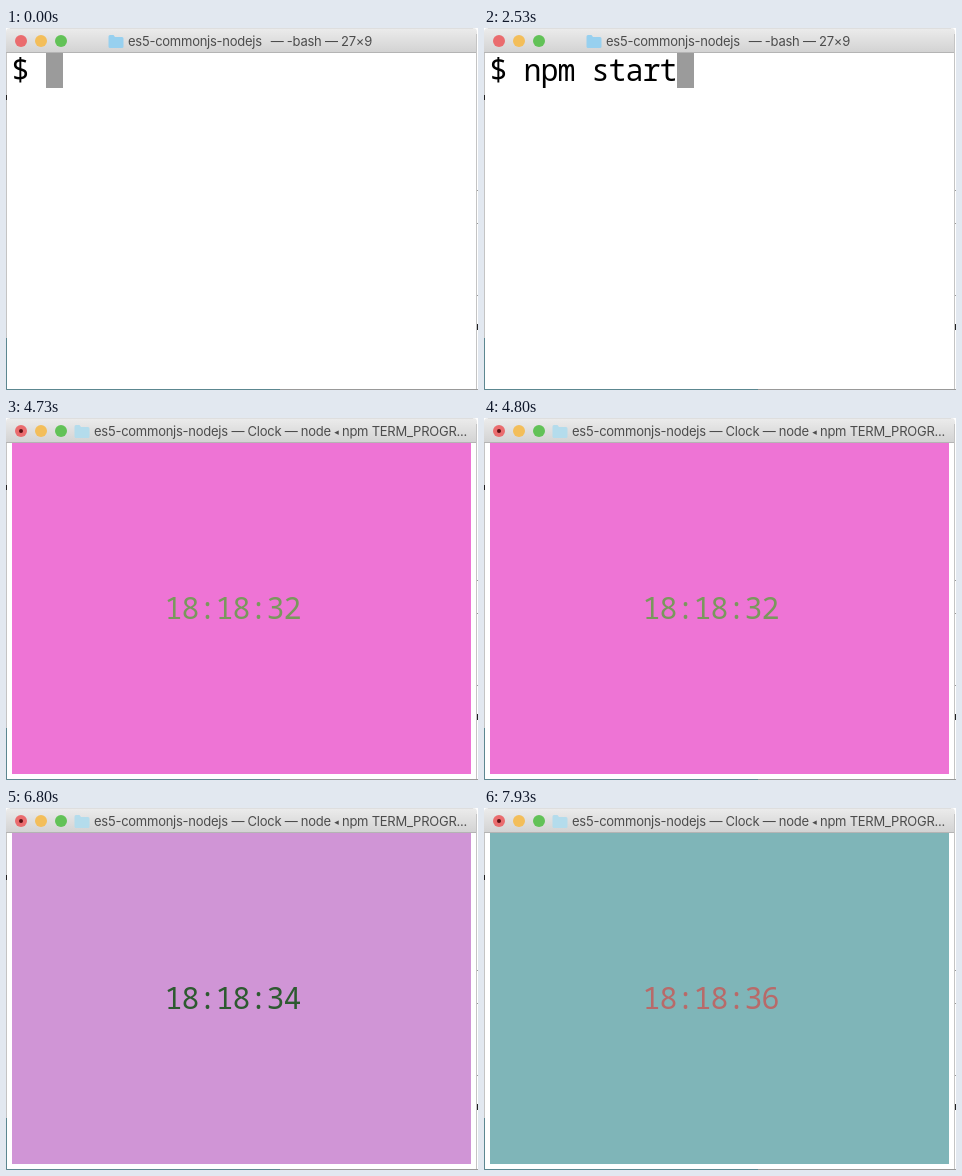
Recreate the animation shown at these times as an HTML page. Size 472 by 362 pixels, loop 8 s.

```html
<!DOCTYPE html>
<html lang="en">
<head>
<meta charset="utf-8">
<title>Terminal clock</title>
<style>
  html, body { margin: 0; width: 100%; height: 100%; overflow: hidden; background: #fff; }
  svg, pre, div { position: absolute; }
  svg { left: 0; top: 0; }
  .title { font: 13px Inter, Roboto, sans-serif; letter-spacing: -.25px; fill: #4c4c4c; }
  .title .arrow { font-size: 9px; }
  #term { left: 6px; top: 25px; width: 459px; height: 331px; overflow: hidden; }
  pre {
    left: -.5px; top: -2px; margin: 0;
    font: 30px/37px "Noto Sans Mono", "DejaVu Sans Mono", monospace;
    letter-spacing: -1px; font-variant-ligatures: none;
  }
  #cursor { width: 17px; height: 37px; background: #9b9b9b; }
</style>
</head>
<body>
<svg width="472" height="362" viewBox="0 0 472 362">
  <defs>
    <linearGradient id="bar" x2="0" y2="1">
      <stop stop-color="#ececec"/><stop offset="1" stop-color="#d3d3d3"/>
    </linearGradient>
  </defs>
  <rect width="472" height="362" fill="#fff"/>
  <path d="M0 24V4Q0 0 4 0H467Q471 0 471 4V24Z" fill="url(#bar)"/>
  <path d="M4 .5H467" stroke="#dedede"/>
  <path d="M0 24.5H470" stroke="#b4b4b4"/>
  <path d="M.5 25V361M470.5 6V361" stroke="#c4c4c4"/>
  <path d="M0 361.5H472" stroke="#999"/>
  <path d="M.5 310V361.5H274" fill="none" stroke="#5c8790"/>
  <path d="M.5 67V72M471.5 296V302" stroke="#222"/>
  <path d="M471 162.5H472M471 195.5H472M471 267.5H472" stroke="#999"/>
  <circle cx="15" cy="13" r="6" fill="#ea6c6e"/>
  <circle cx="35" cy="13" r="6" fill="#f3be5a"/>
  <circle cx="55" cy="13" r="6" fill="#62c257"/>
  <circle id="dot" cx="15" cy="13" r="2" fill="#5a1012"/>
  <path id="folder" d="M0 1.5Q0 0 1.5 0H5L6.5 2H13.5Q15 2 15 3.5V11.5Q15 13 13.5 13H1.5Q0 13 0 11.5Z"/>
  <text id="name" class="title" y="18">es5-commonjs-nodejs</text>
  <text id="tail" class="title" y="18" text-anchor="end"><tspan id="job"></tspan><tspan id="arrow" class="arrow" dy="-1">◂</tspan><tspan id="args" dy="1"></tspan></text>
  <path id="marks" d="M6 28.5H3.5V52.5H6M465 28.5H467.5V52.5H465" fill="none" stroke="#b5b5b5"/>
</svg>
<div id="term">
  <div id="cursor"></div>
  <pre id="screen"></pre>
</div>
<script>
const LOOP = 8000, COL = 17, ROW = 37;
const ENTER = 2930, OUTPUT = 3530, CLOCK = 3730;
const $ = id => document.getElementById(id);

const command = "npm start";
const keyTimes = [870, 1000, 1070, 1200, 1530, 1670, 1800, 1930, 2070];
const output = [
  "", "> @ start /Users/julien/Des", "ktop/js-modules/es5-commonj",
  "s-nodejs", "> node index", "", ""
];

// start, seconds, background, digits
const ticks = [
  [3730, 31, "#8fa3c0", "#705c3f"],
  [4730, 32, "#ee74d5", "#79985c"],
  [5730, 33, "#6bdb7c", "#a8609c"],
  [6730, 34, "#d095d6", "#2d5a30"],
  [7730, 36, "#7fb5b8", "#b86a69"]
];

// start, text before and after the arrow
const titles = [
  [0, "— -bash — 27×9", ""],
  [ENTER, "— npm TERM_PROGRAM=Apple_Termi...", ""],
  [OUTPUT, "— node ", " npm TERM_PROGRAM=Appl..."],
  [CLOCK, "— Clock — node ", " npm TERM_PROGR..."]
];

const show = (id, on) => $(id).style.display = on ? "" : "none";
const latest = (list, t) => list.filter(item => t >= item[0]).pop();

function drawTitle(t) {
  const running = t >= ENTER, x = running ? 88 : 122;
  const [, job, args] = latest(titles, t);
  $("name").setAttribute("x", x);
  $("folder").setAttribute("transform", `translate(${x - 19.5} 7)`);
  $("folder").setAttribute("fill", running ? "#b4dcec" : "#97d0ef");
  $("tail").setAttribute("x", running ? 461 : 366);
  $("job").textContent = job;
  $("args").textContent = args;
  show("arrow", args);
  show("dot", running);
}

function drawShell(t) {
  const typed = keyTimes.filter(k => t >= k).length;
  const lines = ["$ " + command.slice(0, typed)];
  if (t >= OUTPUT) lines.push(...output);
  else if (t >= ENTER) lines.push("");
  const last = lines.length - 1;
  $("screen").textContent = lines.join("\n");
  $("screen").style.color = "#000";
  $("term").style.background = "none";
  $("cursor").style.left = lines[last].length * COL + "px";
  $("cursor").style.top = last * ROW - 2 + "px";
}

function drawClock(t) {
  const [, seconds, back, ink] = latest(ticks, t);
  $("screen").textContent = "\n".repeat(4) + " ".repeat(9) + "18:18:" + seconds;
  $("screen").style.color = ink;
  $("term").style.background = back;
}

function draw(now) {
  const t = now % LOOP, clock = t >= CLOCK;
  drawTitle(t);
  (clock ? drawClock : drawShell)(t);
  show("cursor", !clock);
  show("marks", t >= ENTER && !clock);
}

const start = performance.now();
function frame() {
  draw(performance.now() - start);
  requestAnimationFrame(frame);
}
frame();
</script>
</body>
</html>
```
